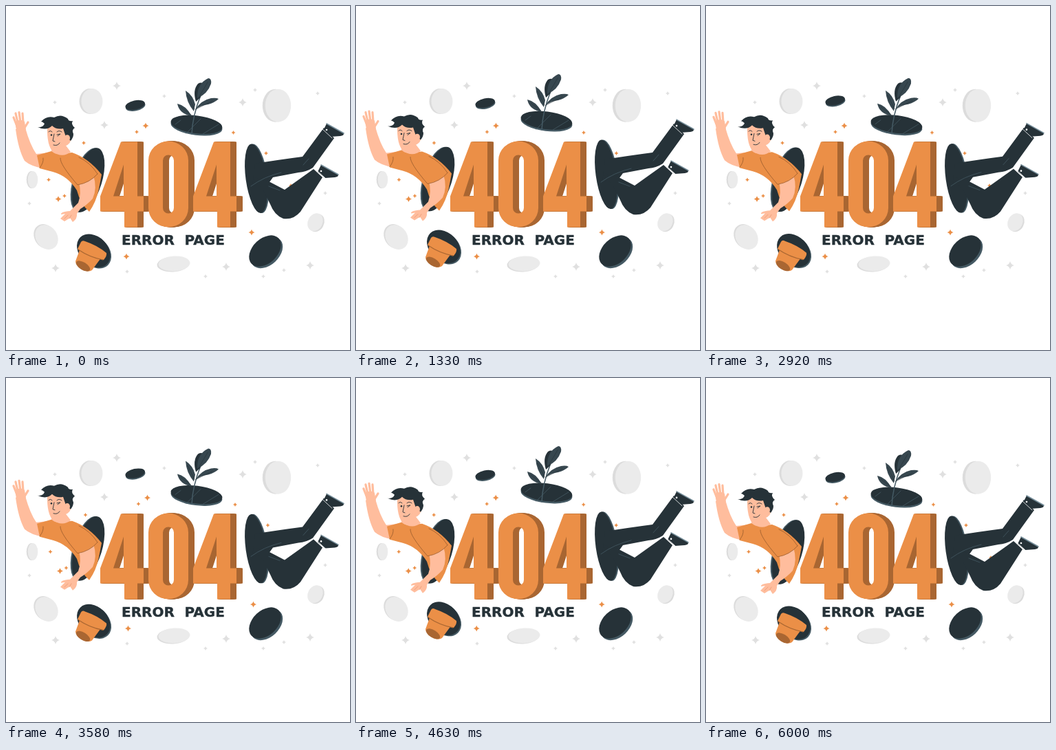
Write an HTML page that moves like this. It is 500x500 px and loops after 6.04 s.

```html
<!DOCTYPE html>
<html lang="en">
<head>
<meta charset="utf-8">
<title>404 error page</title>
<style>
  html, body { margin: 0; width: 100%; height: 100%; overflow: hidden; background: #fff; }
  svg { display: block; width: 100vw; height: 100vh; }
  text { font: bold 20px "DejaVu Sans", sans-serif; fill: #263238; stroke: #263238; stroke-width: .4; }
  .line { fill: none; stroke-linecap: round; stroke-linejoin: round; }
  .coin { fill: #ebebeb; }
  .coin.rim { fill: #dcdcdc; }
  .hole, .dark { fill: #263238; }
  .hole.rim { fill: #455a64; }
  .skin { fill: #ffbd9d; }
  .orange { fill: #eb8f47; }
  .brown { fill: #a96632; }
  .grey { fill: #e0e0e0; }
</style>
</head>
<body>
<svg viewBox="0 0 500 500">
  <defs>
    <path id="big" d="M0-6Q1.200-1.200 6 0Q1.200 1.200 0 6Q-1.200 1.200-6 0Q-1.200-1.200 0-6Z"/>
    <use id="mid" href="#big" transform="scale(.77)"/>
    <use id="small" href="#big" transform="scale(.5)"/>
  </defs>

  <ellipse class="coin" data-rim="-3 0" cx="125" cy="138.500" rx="15.500" ry="18.500"/>
  <ellipse class="coin" data-rim="-4 0" cx="395.500" cy="144.700" rx="18.700" ry="24"/>
  <ellipse class="coin" data-rim="-2 0" cx="39" cy="252.500" rx="7.300" ry="12.500"/>
  <ellipse class="coin" data-rim="-2 -1" cx="59" cy="336" rx="15.500" ry="19" transform="rotate(-35 59 336)"/>
  <ellipse class="coin" data-rim="-2 1" cx="244.500" cy="374.500" rx="23" ry="11" transform="rotate(-3 244 374)"/>
  <ellipse class="coin" data-rim="2 1" cx="449.500" cy="314" rx="10.700" ry="13.500" transform="rotate(28 449 314)"/>

  <g class="grey">
    <use href="#big" x="161" y="116"/><use href="#big" x="143" y="173"/><use href="#big" x="344" y="140"/>
    <use href="#big" x="72" y="381"/><use href="#big" x="320" y="379"/><use href="#big" x="442" y="377"/>
    <use href="#small" x="71" y="140"/><use href="#small" x="230" y="131"/><use href="#small" x="362" y="122"/>
    <use href="#small" x="453" y="127"/><use href="#small" x="464" y="272"/><use href="#small" x="34" y="287"/>
    <use href="#small" x="176" y="386"/><use href="#small" x="290" y="393"/><use href="#small" x="374" y="393"/>
    <use href="#small" x="404" y="384"/>
  </g>

  <g id="sparks" class="orange">
    <use href="#mid" x="203" y="174"/><use href="#mid" x="76" y="280.500"/>
    <use href="#mid" x="357" y="329"/><use href="#mid" x="175" y="364"/>
    <use href="#small" x="190" y="183"/><use href="#small" x="113" y="199"/><use href="#small" x="62" y="252.500"/>
    <use href="#small" x="85" y="276"/><use href="#small" x="330.500" y="184"/>
    <use href="#small" x="378" y="214"/><use href="#small" x="414" y="261"/>
  </g>

  <g id="title"></g>
  <text x="168" y="347">ERROR</text>
  <text x="259.500" y="347">PAGE</text>

  <ellipse class="hole" data-rim="2.500 2.500" cx="376.500" cy="356" rx="27" ry="18" transform="rotate(-43 376.500 356)"/>
  <g id="pebble">
    <ellipse class="hole" data-rim=".5 1.800" cx="187.700" cy="144" rx="14.500" ry="6.700" transform="rotate(-12 187.700 144)"/>
  </g>

  <g id="plant">
    <ellipse class="hole" data-rim="0 2.500" cx="277" cy="172.300" rx="37.700" ry="13" transform="rotate(7 277 172)"/>
    <path class="line" d="M246 172L254 166M262 185L283 164M286 186L309 172" stroke="#455a64" stroke-width=".8"/>
    <path class="line" d="M270 186Q271 160 283 130" stroke="#455a64" stroke-width="1.500"/>
    <path class="dark" d="M276 139Q271 122 279 113Q286 109 288 116Q288 130 276 139Z"/>
    <g fill="#37474f">
      <path d="M278 134Q277 113 294 105Q299 105 298 113Q293 128 278 134Z"/>
      <path d="M275 151Q283 137 298 134Q306 133 309 135Q304 140 294 143Q283 144 275 151Z"/>
      <path d="M273 153Q262 140 261 123Q272 130 275 143Z"/>
      <path d="M270 160Q252 157 249 142Q261 144 270 160Z"/>
    </g>
    <path class="line" d="M277 138L293 111M276 150L300 138M274 150L264 130M269 158L254 147" stroke="#263238" stroke-width=".6"/>
  </g>

  <g id="pot">
    <ellipse class="hole" data-rim="1.500 1.500" cx="127.300" cy="355.700" rx="27.500" ry="20.500" transform="rotate(45 127.300 355.700)"/>
    <path class="orange" d="M108 352L139 365L125 384Q119 388 109 382Q101 376 101 371Z"/>
    <ellipse class="brown" cx="112" cy="378" rx="11.500" ry="5.500" transform="rotate(32 112 378)"/>
    <path class="orange" d="M109 343Q111 340 115 342Q133 348 146 359Q147 363 142 369Q121 365 104 353Z"/>
    <path class="line" d="M105 354Q121 365 141 369" stroke="#a96632" stroke-width="1.200"/>
  </g>

  <g id="legs">
    <ellipse class="hole" data-rim="2 0" cx="363.500" cy="250.700" rx="15" ry="50.700" transform="rotate(-8 363.500 250.700)"/>
    <path class="dark" d="M362 229Q400 223 431 219L462 177L477 192L446 235Q437 241 425 242L388 249L380 260L358 262Z"/>
    <path class="dark" d="M358 248L382 255L405 267L447 237L460 249L428 299Q418 311 403 309Q390 304 384 288L374 268Z"/>
    <path class="line" d="M356 262Q375 248 400 242M382 262L398 268M440 222L432 231" stroke="#455a64" stroke-width=".8"/>
    <g id="shoe">
      <path class="dark" d="M466 171L490 184Q493 188 486 189L472 190L461 181Z"/>
      <path class="line" d="M466 171L491 185" stroke="#78909c" stroke-width="1.600"/>
      <path class="line" d="M460 179L474 192" stroke="#fff" stroke-width=".8"/>
      <circle cx="466" cy="180" r="1.300" fill="#fff"/>
    </g>
    <use href="#shoe" x="-8" y="60"/>
  </g>

  <g id="man">
    <ellipse class="hole" data-rim="-2 0" cx="119.500" cy="253" rx="20" ry="48.500" transform="rotate(17 119.500 253)"/>
    <path class="skin" d="M14 179Q18 209 27 225Q36 233 54 236L64 213L44 215Q35 202 28 177Z"/>
    <path class="skin" d="M13 169Q20 163 27 168L29 180Q21 188 15 180Z"/>
    <path class="line" d="M15 172L11 162M17 169L14 156M21 169L19 154.500M25 170L24 156M27 177L32 169" stroke="#ffbd9d" stroke-width="3.200"/>
    <path class="orange" d="M45 217L66 211Q82 215 96 213Q120 221 139 245L135 266Q131 285 121 299Q108 288 103 268Q90 247 68 241L49 236Z"/>
    <path class="skin" d="M66 208L84 199L94 212Q82 222 66 211Z"/>
    <path class="skin" d="M106 256L127 246Q133 265 126 280Q118 289 108 295L103 302Q104 309 97 314L93 308L85 313L79 309L86 302L80 303Q79 299 93 298L105 286Q110 272 106 256Z"/>
    <path class="line" d="M85 309L90 304M92 309L95 304" stroke="#e59572" stroke-width=".7"/>
    <path class="orange" d="M82 226Q92 246 104 260Q122 257 133 244Q122 226 106 219Q90 216 82 226Z"/>
    <path class="line" d="M79 221Q78 230 104 260Q122 257 133 244M49 235Q55 228 54 221M106 220Q122 227 133 244" stroke="#8f552a" stroke-width=".7"/>
    <path class="skin" d="M60 175Q59 203 69 213Q78 219 85 204Q95 201 95 190L89 172L70 170Z"/>
    <path class="dark" d="M46 176Q54 177 56 171Q53 168 51 168Q59 159 70 162Q80 156 90 164Q91 168 97 167Q94 172 100 177Q95 180 98 186Q98 191 94 196L87 190L83 178Q73 180 67 174Q59 182 46 176Z"/>
    <ellipse class="skin" cx="89" cy="192" rx="4" ry="4.800"/>
    <g class="line" stroke="#263238" stroke-width=".9">
      <path d="M62 183Q64 180 67 183M74 183Q77 180 81 183M74 187L79 186L75 189M70 186L68 196L71 197M69 202Q75 204 78 199"/>
    </g>
    <circle class="dark" cx="66" cy="187.500" r="1.300"/>
  </g>
</svg>
<script>
const $ = selector => document.querySelector(selector);

// Every disc gets a shifted copy behind it as its visible edge.
for (const face of document.querySelectorAll('[data-rim]')) {
  const rim = face.cloneNode();
  rim.classList.add('rim');
  rim.setAttribute('transform', `translate(${face.dataset.rim}) ${face.getAttribute('transform') || ''}`);
  face.before(rim);
}

// Digits with a solid side that runs to the right.
function digit(x, y, d) {
  const layer = (dx, color) =>
    `<path class="${color}" d="${d}" fill-rule="evenodd" transform="translate(${x + dx} ${y})"/>`;
  let out = '';
  for (let dx = 9; dx > 0; dx--) out += layer(dx, 'brown');
  return out + layer(0, 'orange');
}
const four = 'M30 0H54V79H63V101H54V124H35V101H0V79ZM34 33V79H19Z';
const zero = 'M0 29A29 28 0 0 1 58 29V98A29 28 0 0 1 0 98ZM21 29V98A8 8 0 0 0 37 98V29A8 8 0 0 0 21 29Z';
$('#title').innerHTML = digit(137, 197.500, four) + digit(207, 195.500, zero) + digit(272, 197.500, four);

const LOOP = 6040, LIFT = 20 / 3;
const floatY = (t, period) => -LIFT * (1 - Math.abs(1 - 2 * (t % period) / period));

// Ten linear swings that double up to a limit, then die down the same way.
const swing = i => i % 10 ? (-1) ** i * Math.min(4, 2 ** (Math.min(i, 10 - i) - 1)) * 2 / 3 : 0;
function shakeX(t) {
  const p = t % 6000 / 600, i = Math.floor(p);
  return swing(i) + (swing(i + 1) - swing(i)) * (p - i);
}

const move = (id, x, y) => $(id).setAttribute('transform', `translate(${x} ${y})`);

function draw(t) {
  for (const id of ['#plant', '#pot', '#legs']) move(id, 0, floatY(t, 3000));
  move('#man', 0, floatY(t, 1500));
  move('#pebble', 0, floatY(t, 6000));
  move('#sparks', shakeX(t), 0);
}

function tick() {
  draw(performance.now() % LOOP);
  requestAnimationFrame(tick);
}
tick();
</script>
</body>
</html>
```
